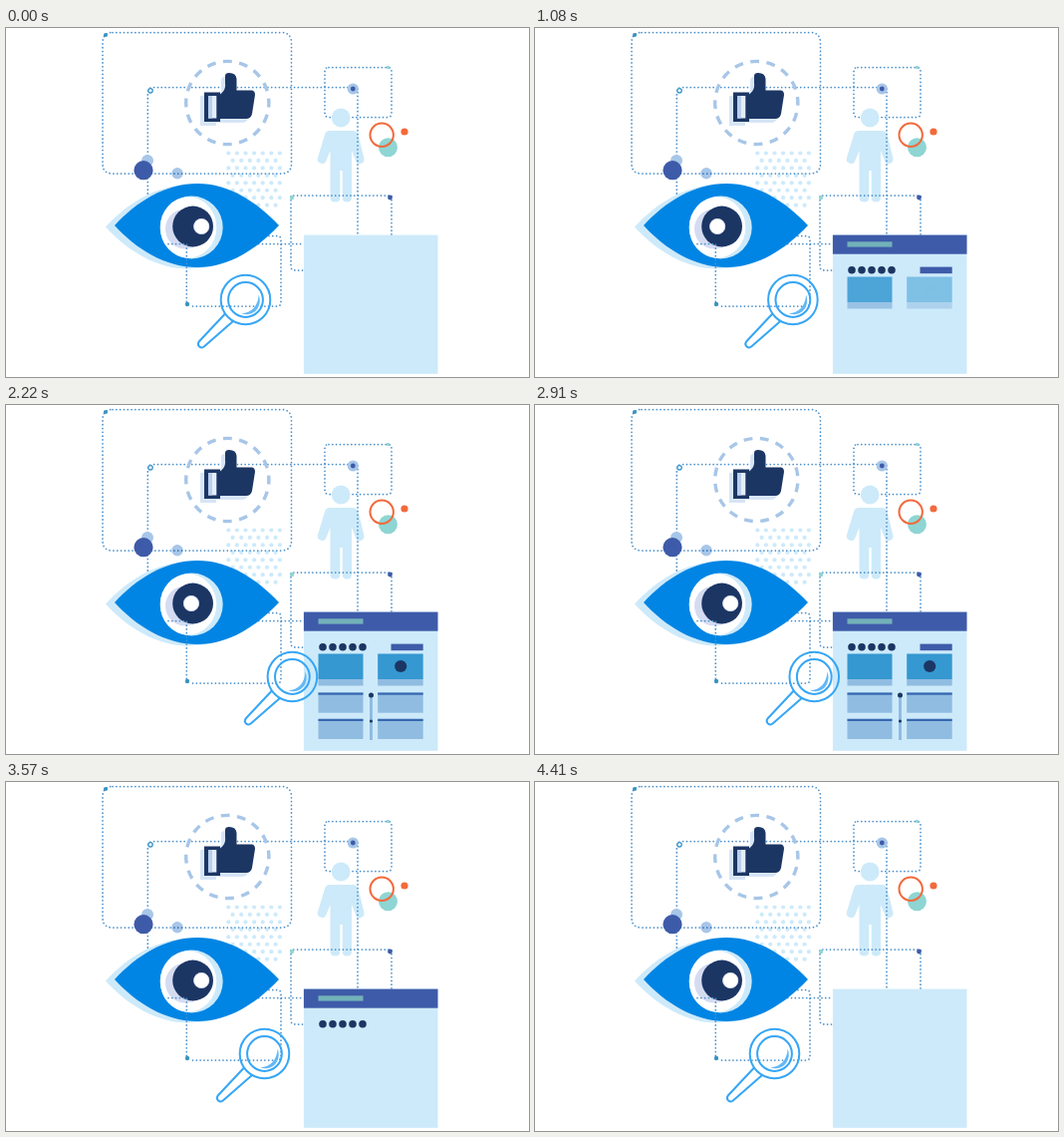
An HTML page with a canvas that plays this animation: 525 px wide and 350 px high, repeating every 4.44 s.

```html
<!DOCTYPE html>
<html lang="en">
<head>
<meta charset="utf-8">
<title>Research illustration</title>
<style>
html, body { margin: 0; width: 100%; height: 100%; overflow: hidden; background: #fff; }
canvas { display: block; width: 525px; height: 350px; }
</style>
</head>
<body>
<canvas id="stage"></canvas>
<script>
const LOOP = 4440, W = 525, H = 350, TAU = Math.PI * 2;
const NAVY = '#1c3664', BLUE = '#3e5ba9', PALE = '#cdeafa', SKY = '#0085e4', DOTTED = '#4a90cb',
  LENS = '#36a6f5', CARD = '#90bce1', LILAC = '#d5dcf2', MIST = '#a7c6e8', TEAL = '#8fd5d3', ORANGE = '#f26a3c';

const canvas = document.getElementById('stage');
const ctx = canvas.getContext('2d');
const ratio = window.devicePixelRatio || 1;
canvas.width = W * ratio;
canvas.height = H * ratio;

const clamp = v => Math.min(1, Math.max(0, v));
const ramp = (t, from, to) => clamp((t - from) / (to - from));
const smooth = v => (1 - Math.cos(Math.PI * v)) / 2;

// Monotone cubic through [time, value] stops.
function track(stops, t) {
  const slope = i => (stops[i + 1][1] - stops[i][1]) / (stops[i + 1][0] - stops[i][0]);
  const tangent = i => {
    if (i === 0 || i === stops.length - 1) return 0;
    const a = slope(i - 1), b = slope(i);
    return a * b <= 0 ? 0 : 2 * a * b / (a + b);
  };
  let i = 0;
  while (i < stops.length - 2 && t > stops[i + 1][0]) i++;
  const [t0, v0] = stops[i], [t1, v1] = stops[i + 1];
  const d = t1 - t0, u = clamp((t - t0) / d), w = 1 - u;
  return v0 * (1 + 2 * u) * w * w + tangent(i) * d * u * w * w
    + v1 * u * u * (3 - 2 * u) - tangent(i + 1) * d * u * u * w;
}

function rect(x, y, x2, y2, color) {
  ctx.fillStyle = color;
  ctx.fillRect(x, y, x2 - x, y2 - y);
}

function disc(x, y, r, color) {
  ctx.fillStyle = color;
  ctx.beginPath();
  ctx.arc(x, y, r, 0, TAU);
  ctx.fill();
}

function ring(x, y, r, color, width) {
  ctx.strokeStyle = color;
  ctx.lineWidth = width;
  ctx.beginPath();
  ctx.arc(x, y, r, 0, TAU);
  ctx.stroke();
}

function shape(d, color) {
  ctx.fillStyle = color;
  ctx.fill(new Path2D(d));
}

function dotted(d) {
  ctx.save();
  ctx.strokeStyle = DOTTED;
  ctx.lineWidth = 1.75;
  ctx.lineCap = 'round';
  ctx.setLineDash([0.01, 3.8]);
  ctx.stroke(new Path2D(d));
  ctx.restore();
}

function drawLines() {
  dotted('M107 4.5H276Q286.5 4.5 286.5 15V136Q286.5 146 276 146H107Q97 146 97 136V15Q97 4.5 107 4.5Z');
  dotted('M142.3 166V65Q142.3 59.5 148 59.5H353V207');
  dotted('M387 207V168H286V239Q286 243 290 243H299');
  dotted('M181.3 216.5H299');
  dotted('M264 208.5H272Q276 208.5 276 212.5V275Q276 279 272 279H185');
}

function drawNodes() {
  disc(100, 7, 2.1, '#3994bd');
  disc(145, 62.8, 2.5, '#fff');
  ring(145, 62.8, 2.2, '#3994c7', 1.3);
  disc(348.3, 61, 5.6, MIST);
  disc(348.3, 61, 2.4, BLUE);
  disc(383.5, 39.5, 1.7, TEAL);
  disc(287, 170, 2.2, TEAL);
  disc(385.5, 170, 2.4, BLUE);
  disc(182, 277, 2.2, '#3994bd');
}

function drawPattern() {
  for (let row = 0; row < 8; row++) {
    const odd = row % 2;
    for (let col = 0; col < 7 - odd; col++) {
      disc(223.3 + (col + odd / 2) * 8.6, 125.5 + row * 7.45, 2.1, PALE);
    }
  }
}

function drawLike(t) {
  ctx.save();
  ctx.translate(222.3, 75);
  ctx.rotate(t / LOOP * TAU);
  const r = 41.6, step = TAU / 16, half = step * 0.27;
  ctx.strokeStyle = MIST;
  ctx.lineWidth = 3.4;
  for (let i = 0; i < 16; i++) {
    ctx.beginPath();
    ctx.arc(0, 0, r, i * step - half, i * step + half);
    ctx.stroke();
  }
  ctx.restore();

  const hand = 'M211 69C217 66 221 62 220 55V48Q220 45 224 45Q231 45 231.5 51V62.5H247Q250 63 250 67L247 86Q246 91 241 91H211Z';
  ctx.save();
  ctx.translate(-4, 4);
  shape(hand + 'M199 64H215V94H199Z', '#d7e6f7');
  ctx.restore();
  shape(hand, NAVY);
  rect(199, 64.5, 215, 94, NAVY);
  rect(203, 68, 211.3, 90.5, '#e6eefa');
  rect(203, 68, 207, 90.5, '#b9cfec');
}

function drawPerson() {
  disc(336.2, 90, 9.4, PALE);
  shape('M325 103H348Q352 103 353.5 107L359.5 131Q360 135 356 136Q352 137 351 133L347 123V170Q347 174.5 342.3 174.5Q337.7 174.5 337.7 170V143H335.3V170Q335.3 174.5 330.5 174.5Q325.5 174.5 325.5 170V123L321.5 133Q320 137 316 135.8Q311.5 134 313 130L320 107Q321 103 325 103Z', PALE);
}

function drawAccents() {
  disc(142, 133, 6, MIST);
  disc(138, 142.7, 9.6, BLUE);
  ctx.save();
  ctx.globalCompositeOperation = 'multiply';
  disc(172, 145.8, 5.7, MIST);
  ctx.restore();
  disc(383.5, 119.8, 9.5, TEAL);
  ring(377.2, 107.3, 11.7, ORANGE, 2);
  disc(400, 104, 3.6, ORANGE);
}

function drawEye(t) {
  const lid = 'M109 198C131 174 160 156 192 156S251 174 274 198C251 222 224 240 192 240S131 222 109 198Z';
  ctx.save();
  ctx.translate(-9, 1.5);
  shape(lid, PALE);
  ctx.restore();
  shape(lid, SKY);
  disc(186.3, 200, 31.4, PALE);
  ctx.fillStyle = '#fff';
  ctx.beginPath();
  ctx.ellipse(183, 200, 28.3, 30.5, 0, 0, TAU);
  ctx.fill();
  disc(180, 201.5, 20, LILAC);
  disc(187.6, 199, 20.4, NAVY);
  const look = smooth(ramp(t, 490, 1400)) - smooth(ramp(t, 1810, 2710));
  const x = 196.2 - 18 * look;
  disc(x, 199, 7.8, '#fff');
  ring(x, 199, 7.6, LILAC, 0.8);
}

// Page parts build up on the way in and leave in reverse order.
function drawPage(t) {
  const time = Math.min(t, LOOP - t);
  const fade = (from, to, draw) => {
    const alpha = ramp(time, from, to);
    if (!alpha) return;
    ctx.save();
    ctx.globalAlpha = alpha;
    draw();
    ctx.restore();
  };
  const columns = [[313.5, 358.5], [373.2, 418.7]];

  rect(298.9, 207.6, 433.5, 346.8, PALE);
  fade(400, 630, () => rect(298.9, 207.6, 433.5, 226.7, BLUE));
  fade(480, 660, () => rect(313.5, 214.3, 358.5, 219.6, '#73b1ba'));
  fade(600, 810, () => {
    for (let i = 0; i < 5; i++) disc(318 + i * 10, 242.7, 3.8, NAVY);
  });
  fade(900, 1080, () => rect(386.5, 239.6, 418.7, 246.2, BLUE));
  columns.forEach(([x, x2], i) => fade(930 + i * 60, 1110 + i * 60, () => {
    rect(x, 249.5, x2, 275, '#3598d1');
    rect(x, 275, x2, 281.5, CARD);
  }));
  fade(1080, 1260, () => disc(396.2, 262, 6.1, NAVY));
  fade(1110, 1290, () => {
    rect(365, 291, 368, 336, CARD);
    disc(366.5, 291, 2.5, NAVY);
    disc(366.5, 317, 1.6, NAVY);
  });
  [288.5, 314.8].forEach((y, row) => fade(1140 + row * 120, 1320 + row * 120, () => {
    for (const [x, x2] of columns) {
      rect(x, y, x2, y + 20.2, CARD);
      rect(x, y, x2, y + 2.2, '#3767b1');
    }
  }));
}

const lensPath = [[0, 240.5], [690, 250.3], [1530, 270.3], [2220, 287.4], [2350, 287.7],
  [2910, 280.3], [3570, 259.5], [4340, 240.5], [LOOP, 240.5]];

function drawMagnifier(t) {
  ctx.save();
  ctx.translate(track(lensPath, t), 272.5);
  ctx.strokeStyle = LENS;
  ctx.lineWidth = 2;
  ctx.lineJoin = 'round';
  ctx.stroke(new Path2D('M-20.5 14L-46.8 42Q-48.7 44.8 -46.4 46.9Q-43.9 49 -41.4 46.8L-12.5 21.5'));
  ring(0, 0, 24.8, LENS, 2);
  ring(0, 0, 17.4, LENS, 2);
  shape('M13.2 -5C17.5 7 8 18 -4 13.8C6 13.5 12.5 6 13.2 -5Z', '#62b8f6');
  ctx.restore();
}

function render(t) {
  ctx.setTransform(ratio, 0, 0, ratio, 0, 0);
  rect(0, 0, W, H, '#fff');
  drawPattern();
  dotted('M324 39.5H383Q387 39.5 387 43.5V85.5Q387 89.5 383 89.5H324Q320 89.5 320 85.5V43.5Q320 39.5 324 39.5Z');
  drawPerson();
  drawLines();
  drawLike(t);
  drawAccents();
  drawEye(t);
  dotted('M163 216.5H181.3V275Q181.3 279 185 279');
  drawNodes();
  drawPage(t);
  drawMagnifier(t);
}

const start = performance.now();
function tick() {
  render((performance.now() - start) % LOOP);
  requestAnimationFrame(tick);
}
tick();
</script>
</body>
</html>
```
